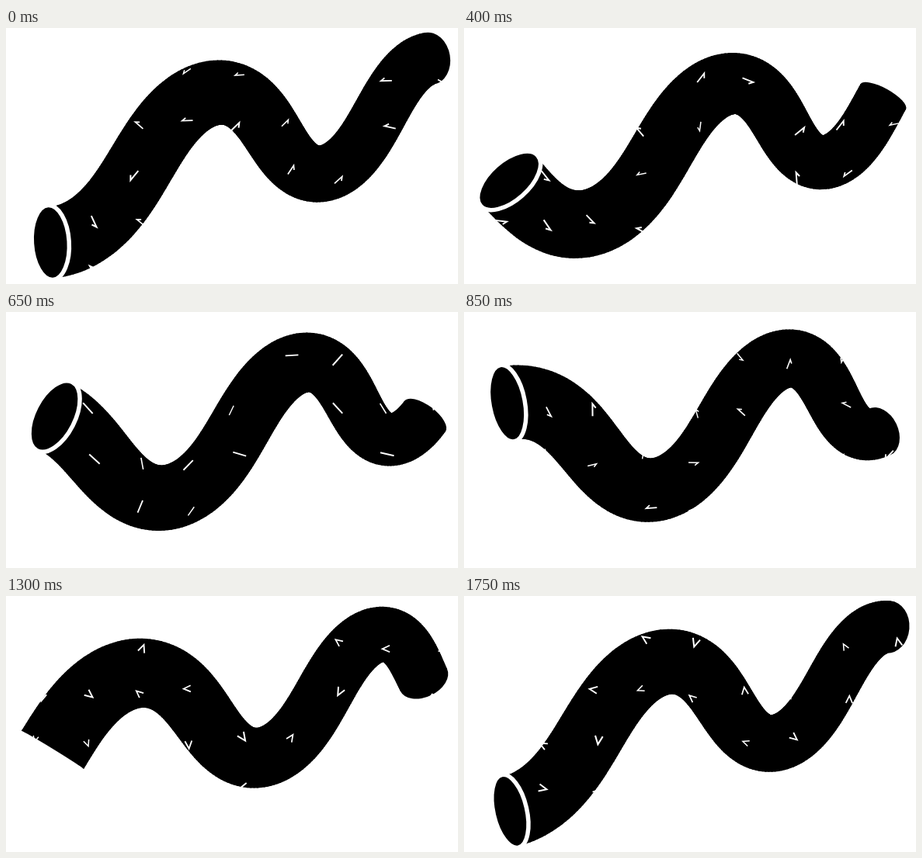
Recreate the animation shown at these times as an HTML page with a canvas. Size 582 by 330 pixels, loop 1.8 s.

```html
<!DOCTYPE html>
<html lang="en">
<head>
<meta charset="utf-8">
<title>Waving tube</title>
<style>
  html, body { margin: 0; width: 100%; height: 100%; overflow: hidden; background: #fff; }
  canvas { display: block; }
</style>
</head>
<body>
<canvas id="stage" width="582" height="330"></canvas>
<script>
const W = 582, H = 330, TAU = Math.PI * 2;
const LOOP = 1800, STEP = 50, COUNT = LOOP / STEP;
const FOCAL = 1150, RADIUS = 46.8;
const START = -0.024, END = 1.507, SLICES = 220, SEAM = 2;
const ctx = document.getElementById('stage').getContext('2d');

// Centre line: a wave on a plane seen in perspective; u counts wavelengths.
// The sway along the axis rounds the crests and steepens the flanks.
function point(u, phase) {
  const theta = TAU * (u - phase);
  const v = -Math.cos(theta);
  const g = 0.267 * (u + 0.014 * Math.sin(2 * theta));
  const w = 1 + g - 0.02 * v;
  return {
    x: (68.5 + 1711 * g - 3 * v) / w,
    y: (196.85 - 147 * g - 83.35 * v) / w,
    w
  };
}

function toSpace(p) {
  return [(p.x - W / 2) * p.w, (p.y - H / 2) * p.w, FOCAL * p.w];
}

function ring(u, phase) {
  const c = point(u, phase);
  const a = point(u - 0.001, phase), b = point(u + 0.001, phase);
  return { x: c.x, y: c.y, r: RADIUS / c.w, angle: Math.atan2(b.y - a.y, b.x - a.x), a, b };
}

// How far the end disc is turned towards the viewer: 0 is edge-on.
function openness({ x, y, a, b }) {
  const from = toSpace(a), to = toSpace(b);
  const dir = to.map((n, i) => n - from[i]);
  const ray = [x - W / 2, y - H / 2, FOCAL];
  const dot = dir.reduce((sum, n, i) => sum + n * ray[i], 0);
  return Math.abs(dot) / Math.hypot(...dir) / Math.hypot(...ray);
}

function disc(o, scale = 1) {
  const r = o.r * scale;
  ctx.beginPath();
  ctx.ellipse(o.x, o.y, r, r * openness(o), o.angle + Math.PI / 2, 0, TAU);
}

function edge(o, side) {
  const d = (o.r - SEAM / 2) * side;
  return [o.x - Math.sin(o.angle) * d, o.y + Math.cos(o.angle) * d];
}

// Slices overlap by their outline, so no seams show between them.
function drawBody(phase) {
  ctx.fillStyle = ctx.strokeStyle = '#000';
  ctx.lineWidth = SEAM;
  ctx.lineJoin = 'round';
  let prev = ring(START, phase);
  for (let i = 1; i <= SLICES; i++) {
    const next = ring(START + (END - START) * i / SLICES, phase);
    ctx.beginPath();
    ctx.moveTo(...edge(prev, -1));
    ctx.lineTo(...edge(next, -1));
    ctx.lineTo(...edge(next, 1));
    ctx.lineTo(...edge(prev, 1));
    ctx.closePath();
    ctx.fill();
    ctx.stroke();
    prev = next;
  }
  disc(prev);
  ctx.fill();
}

function random(seed) {
  const n = Math.sin(seed * 12.9898 + 4.137) * 43758.5453;
  return n - Math.floor(n);
}

const marks = {
  line: [[-9, 0], [9, 0]],
  hook: [[-8, 0], [7, 0], [2, 4]],
  vee: [[-5, -4.5], [5, 0], [-5, 4.5]]
};

// Loose grid of ticks, reshuffled at each step and kept inside the tube.
function drawMarks(step) {
  const shape = marks[step % 3 === 1 ? 'line' : step < COUNT / 2 ? 'hook' : 'vee'];
  ctx.save();
  ctx.globalCompositeOperation = 'source-atop';
  ctx.strokeStyle = '#fff';
  ctx.lineJoin = 'miter';
  for (let row = 0; row < 5; row++) {
    for (let col = 0; col < 9; col++) {
      const seed = (step % 26) * 211 + row * 37 + col * 4;
      const jitter = n => (random(seed + n) - 0.5) * 16;
      const size = 0.75 + random(seed + 3.5) * 0.35;
      ctx.save();
      ctx.translate(42 + col * 64 + jitter(0), 62 + row * 64 + jitter(1));
      ctx.rotate(random(seed + 2) * TAU);
      ctx.scale(size, size);
      ctx.lineWidth = 1.9;
      ctx.beginPath();
      shape.forEach(p => ctx.lineTo(...p));
      ctx.stroke();
      ctx.restore();
    }
  }
  ctx.restore();
}

function drawMouth(phase) {
  disc(ring(START, phase), 1.04);
  ctx.fillStyle = '#000';
  ctx.fill();
  ctx.strokeStyle = '#fff';
  ctx.lineWidth = 5.5;
  ctx.stroke();
}

function draw(step) {
  const phase = step / COUNT + 0.008;
  ctx.clearRect(0, 0, W, H);
  drawBody(phase);
  drawMarks(step);
  drawMouth(phase);
}

const begin = performance.now();
let shown = -1;
function tick() {
  const step = Math.floor((performance.now() - begin) % LOOP / STEP);
  if (step !== shown) draw(shown = step);
  requestAnimationFrame(tick);
}
tick();
</script>
</body>
</html>
```
